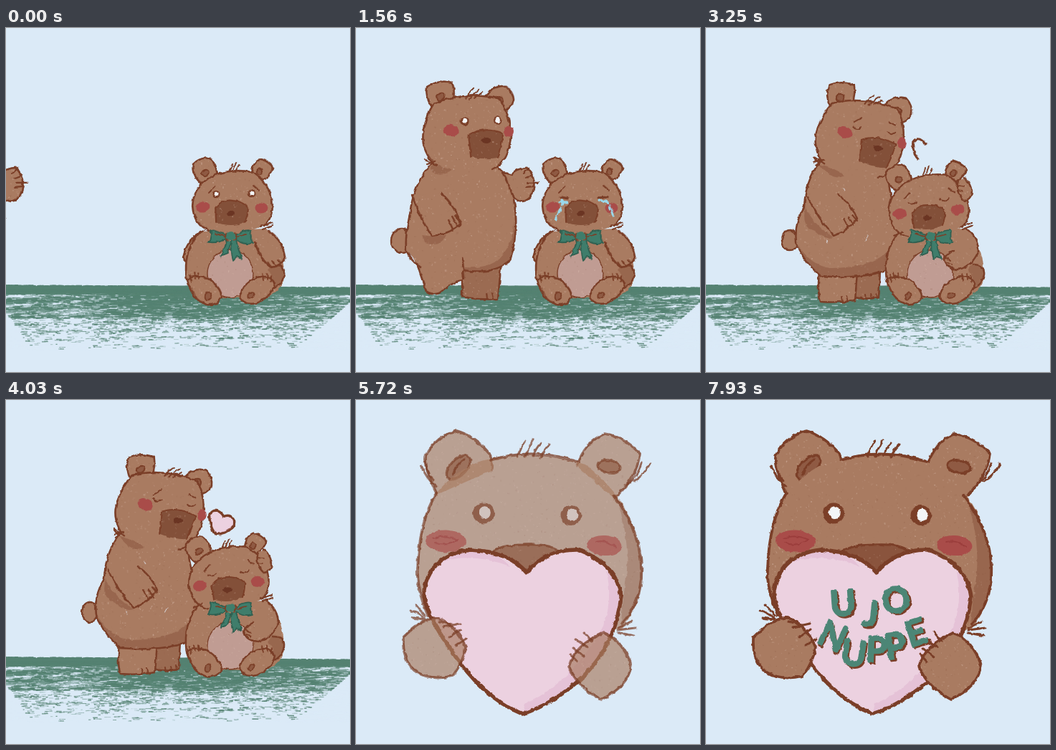
An HTML page with a canvas that plays this animation: 480x480 px, repeating every 8000 ms.

```html
<!DOCTYPE html>
<html lang="fi">
<head>
<meta charset="utf-8">
<title>Teddy bears</title>
<style>
  html, body { margin: 0; width: 100%; height: 100%; overflow: hidden; background: #dbeaf7; }
  #stage { position: relative; width: 480px; height: 480px; overflow: hidden; }
  #scene { position: absolute; inset: 0; }
  canvas { position: absolute; left: -10px; top: -10px; }
  #actors, #front { filter: url(#rough); }
  svg { position: absolute; width: 0; height: 0; }
</style>
</head>
<body>
<svg><filter id="rough" x="0" y="0" width="1" height="1" color-interpolation-filters="sRGB">
  <feTurbulence id="noise" type="fractalNoise" baseFrequency="0.13" numOctaves="2" result="n"/>
  <feDisplacementMap in="SourceGraphic" in2="n" scale="4" xChannelSelector="R" yChannelSelector="G"/>
</filter></svg>
<div id="stage">
  <div id="scene">
    <canvas id="ground" width="500" height="500"></canvas>
    <canvas id="actors" width="500" height="500"></canvas>
  </div>
  <canvas id="front" width="500" height="500"></canvas>
</div>
<script>
const LOOP = 8000, STEP = 130;
const SKY = '#dbeaf7', FUR = '#a97b61', SHADE = 'rgba(125,70,48,.38)', LINE = '#7b3f28';
const MUZZLE = '#835039', CHEEK = '#a94c49', BOW = '#3f7d6b', BELLY = '#c09c93';
const GRASS = '#558272', PINK = '#ecd1e0', TEAR = '#9ad9ec', INNER = '#8f5a43';

const $ = id => document.getElementById(id);
const layer = id => {
  const c = $(id).getContext('2d');
  c.setTransform(1, 0, 0, 1, 10, 10);
  c.lineCap = c.lineJoin = 'round';
  return c;
};
const ground = layer('ground'), actors = layer('actors'), front = layer('front');
let g = actors, boil = 0;

const clamp = v => Math.max(0, Math.min(1, v));
const lerp = (a, b, f) => a + (b - a) * f;
const rad = deg => deg * Math.PI / 180;
function random(seed) {
  return () => {
    seed = (seed + 0x6d2b79f5) | 0;
    let r = Math.imul(seed ^ seed >>> 15, 1 | seed);
    r = r + Math.imul(r ^ r >>> 7, 61 | r) ^ r;
    return ((r ^ r >>> 14) >>> 0) / 4294967296;
  };
}
// Value at time t from rows of [time, value]
function track(rows, t) {
  let i = 1;
  while (i < rows.length - 1 && t > rows[i][0]) i++;
  const [a, va] = rows[i - 1], [b, vb] = rows[i];
  return lerp(va, vb, clamp((t - a) / (b - a)));
}

const grain = (() => {
  const tile = document.createElement('canvas');
  tile.width = tile.height = 180;
  const c = tile.getContext('2d'), r = random(5);
  for (let i = 0; i < 520; i++) {
    c.fillStyle = r() < .65 ? `rgba(224,198,184,${.1 + r() * .3})` : `rgba(120,70,50,${r() * .22})`;
    c.fillRect(r() * 180, r() * 180, .6 + r() * 1.6, .6 + r() * 1.8);
  }
  return actors.createPattern(tile, 'repeat');
})();

const paths = {};
const path = d => paths[d] || (paths[d] = new Path2D(d));

function ink(d, w = 2.4, color = LINE) {
  const p = path(d);
  g.strokeStyle = color;
  g.lineWidth = w;
  g.stroke(p);
  g.save();
  g.translate(.9 - boil * .5, -.8 + boil * .4);
  g.globalAlpha *= .6;
  g.lineWidth = w * .6;
  g.setLineDash([19, 6, 33, 9]);
  g.lineDashOffset = boil * 17;
  g.stroke(p);
  g.restore();
}
function fill(d, color, textured) {
  g.fillStyle = color;
  g.fill(path(d));
  if (!textured) return;
  g.fillStyle = grain;
  g.fill(path(d));
}
function shape(d, color = FUR, w = 2.4) {
  fill(d, color, true);
  ink(d, w);
}
function oval(x, y, rx, ry, color, rot = 0, edge = 0) {
  g.beginPath();
  g.ellipse(x, y, rx, ry, rad(rot), 0, 7);
  g.fillStyle = color;
  g.fill();
  if (edge) { g.strokeStyle = LINE; g.lineWidth = edge; g.stroke(); }
}
function eye(x, y, r) {
  oval(x, y, r, r * .97, LINE);
  oval(x + r * .1, y - r * .05, r * .55, r * .6, '#f3f5f7');
}
// Draws around pivot (px, py) moved to (x, y) and turned
function turned(x, y, px, py, deg, draw) {
  g.save();
  g.translate(x, y);
  g.rotate(rad(deg));
  g.translate(-px, -py);
  draw();
  g.restore();
}

function drawGround() {
  const c = ground, r = random(21);
  const density = (x, y) => {
    if (y < 370) return 1;
    const core = Math.exp(-(((x - 245) / 150) ** 4) - ((y - 372) / 36) ** 4);
    const bands = .45 + .3 * Math.sin(y * .55 + x * .012) + .12 * Math.sin(x * .05);
    return Math.max(core, bands * clamp((452 - y) / 62));
  };
  c.fillStyle = GRASS;
  c.beginPath();
  c.moveTo(-10, 360); c.lineTo(250, 359.5); c.lineTo(490, 363);
  c.lineTo(490, 369); c.lineTo(340, 372); c.lineTo(-10, 369);
  c.fill();
  for (let i = 0; i < 520; i++) {
    const x = r() * 490 - 5;
    c.fillRect(x, 358 + x * .007 + r() * 2, 2 + r() * 5, 2);
  }
  for (let i = 0; i < 15000; i++) {
    const y = 364 + 84 * r() ** 1.15, x = r() * 500 - 10;
    const right = 492 - Math.max(0, y - 370) * 1.15, left = y > 398 ? (y - 398) * .7 : -10;
    if (x > right || x < left || r() > density(x, y)) continue;
    c.globalAlpha = .35 + r() * .55;
    const len = 2 + r() * (y < 405 ? 20 : 7);
    c.fillRect(x, y, Math.min(len, right - x + 2), .7 + r() * 1.3);
  }
  c.fillStyle = SKY;
  for (let i = 0; i < 2600; i++) {
    const y = 371 + 78 * r(), x = r() * 490;
    if (r() < density(x, y) * .85) continue;
    c.globalAlpha = .2 + r() * .5;
    c.fillRect(x, y, 1 + r() * 9, .8 + r());
  }
  c.globalAlpha = 1;
}

function bigHead(x, y, tilt, asleep) {
  turned(x, y, 122, 157, tilt, () => {
    shape('M47 112Q36 98 39 82Q55 72 74 76Q78 88 76 102');
    oval(58, 96, 6, 4.5, INNER, -35, 2.2);
    shape('M120 97Q130 80 148 81Q160 90 160 102Q155 114 143 117');
    oval(139, 101, 5.5, 6, INNER, 20, 2.2);
    const head = 'M47 188Q30 167 34 145Q38 122 48 106Q88 88 138 98Q152 112 156 145Q156 185 130 197';
    fill(head + 'Q85 208 47 188Z', FUR, true);
    ink(head);
    ink('M93 99Q97 90 103 85M99 99Q105 91 112 86M105 98L116 90', 2);
    ink('M36 184L52 191M40 190L50 186', 2.2);
    oval(73, 143, 11, 8, CHEEK, 18);
    oval(153.5, 144, 6.5, 7.5, CHEEK);
    fill('M97 149Q118 137 145 147Q143 168 138 181Q118 184 100 180Z', MUZZLE, true);
    ink('M100 180L97 149Q118 137 145 147Q143 168 138 181', 1.8);
    oval(122, 157, 6.5, 4, '#6b3523');
    if (asleep) {
      ink('M83 133Q89 138 94 132M131 132Q137 137 142 131M82 127L92 119M131 118L140 121', 1.9);
    } else {
      eye(91, 130, 6.5);
      eye(137, 129, 6);
      if (tilt) ink('M80 127L88 120M134 119L142 124', 1.9);
    }
  });
}

function walkingBear(dx, t) {
  const phase = (t - 1040) / STEP * Math.PI / 4, swing = 15 * Math.sin(phase);
  g.save();
  g.translate(dx, -3 * Math.abs(Math.sin(phase)));
  oval(4, 297, 15, 17, FUR, 0, 2.4);
  shape('M136 204Q146 200 157 205Q160 197 178 195Q190 205 188 222Q186 240 172 242Q160 240 158 231');
  ink('M174 203L181 196M177 209L187 205M179 216L195 216M178 222L188 221', 2);
  turned(115, 330, 115, 330, -swing, () => {
    shape('M88 333L88 375Q110 380 138 378L142 333', '#9b6b52');
    ink('M122 371L123 378M130 370L132 378', 1.8);
  });
  turned(60, 330, 60, 330, swing, () => shape('M22 320Q30 345 38 368Q45 373 56 370Q70 358 90 350L88 328'));
  const body = 'M88 321L90 338Q130 345 155 325Q168 280 160 240Q152 210 138 194';
  fill('M47 188Q20 215 15 260Q8 290 10 310Q30 337 60 342L90 338Q130 345 155 325Q168 280 160 240Q152 210 138 194Z', FUR, true);
  fill('M160 270Q160 305 135 326Q118 336 92 334L90 339Q130 345 155 325Q163 300 160 270Z', SHADE);
  fill('M48 190Q68 184 74 198Q55 212 44 197Z', SHADE);
  ink(body);
  ink('M47 188Q20 215 15 260Q8 290 10 310Q16 325 30 334');
  fill('M18 232Q30 270 46 290Q70 288 85 274Q80 250 58 230Z', FUR, true);
  fill('M33 289L48 291Q62 290 66 288Q60 306 36 299Z', SHADE);
  ink('M18 232Q30 270 46 290Q70 288 85 274Q80 250 58 230');
  ink('M69 268L75 281M74 263L81 276M78 262L86 270', 2);
  bigHead(122, 157, 0, false);
  g.restore();
}

function huggingBear(dx, t) {
  const calm = t >= 2730;
  g.save();
  g.translate(dx, 0);
  oval(117, 296, 11, 14, FUR, 0, 2.4);
  shape('M208 340L206 376Q225 379 241 376L243 338', '#9b6b52');
  ink('M222 372L223 379M230 371L232 378M237 370L238 376', 1.8);
  shape('M158 340Q155 370 160 382Q185 384 208 380L211 340');
  ink('M189 375L190 383M196 374L198 382', 1.8);
  const left = 'M158 188Q138 215 137 250Q121 275 127 305Q140 330 160 346';
  const right = 'Q205 350 240 342Q275 330 277 300Q274 285 262 250Q255 225 252 194';
  fill(left + right + 'Z', FUR, true);
  fill('M127 300Q145 332 175 335Q230 335 256 310Q270 295 268 270L277 300Q275 330 240 342Q205 350 160 346Q138 328 127 300Z', SHADE);
  fill('M139 250Q150 275 178 292Q165 296 152 283Q132 278 139 250Z', SHADE);
  fill('M158 190Q184 196 194 207Q175 214 158 190Z', SHADE);
  ink(left);
  ink('M160 346' + right);
  ink('M142 236Q156 266 178 290Q197 284 211 266Q203 245 184 232');
  ink('M192 266L199 279M198 264L206 276M204 261L211 269', 2);
  ink('M222 297L226 290M170 300L168 295M192 224L194 228', 1, 'rgba(226,231,240,.75)');
  bigHead(calm ? 240 : 239, calm ? 168 : 165, calm ? 10 : 8, calm);
  ink('M150 180L158 190M151 188L163 184M153 192L160 187', 2.2);
  g.restore();
}

function tears(t) {
  const fall = t / 390 % 1;
  ink('M287 240L290 244M284 243L294 243M339 240L351 243', 3, TEAR);
  for (let i = 0; i < 3; i++) {
    const f = (fall + i / 3) % 1;
    oval(lerp(289, 275, f), lerp(245, 276, f), 1.5, 3.4, TEAR, 20);
    oval(lerp(350, 362, f), lerp(243, 268, f), 1.5, 3.2, TEAR, -20);
  }
  ink('M286 250L280 262M354 246L358 257', 1.5, TEAR);
}

function smallHead(t, hug) {
  const cry = t >= 650 && t < 2730;
  shape('M272 217Q258 204 261 190Q270 180 284 182Q296 192 294 208');
  oval(278, 202, 5, 4, INNER, -25, 2);
  shape('M342 203Q345 186 356 183Q369 188 373 196Q370 206 357 212');
  oval(354, 200, 4, 4.5, INNER, 30, 2);
  const head = 'M284 283Q262 276 260 248Q262 218 292 205Q316 196 343 201Q362 212 370 235Q376 262 360 276';
  fill(head + 'Q318 292 284 283Z', FUR, true);
  ink(head);
  ink('M311 200L316 190M315 200L321 188M320 200L325 191', 1.8);
  oval(275, 250, 9.5, 7.5, CHEEK, -10);
  oval(356, 251, 9.5, 7.5, CHEEK);
  fill('M292 251Q300 239 316 241Q334 243 338 252Q337 263 333 271Q315 279 293 271Z', MUZZLE, true);
  ink('M293 271L292 251Q300 239 316 241Q334 243 338 252Q337 263 333 271', 1.8);
  oval(313, 259, 6, 3.4, '#6b3523');
  ink('M283 230L291 222M345 220L353 227', 1.8);
  if (hug) ink('M288 236Q294 240 300 235M333 235Q339 240 345 235', 1.8);
  else if (cry) ink('M285 236L296 238M338 237L351 236', 3);
  else { eye(293, 232, 5.5); eye(342, 231, 5.5); }
  if (cry) tears(t);
}

function bow() {
  fill('M308 295Q306 308 299 318L309 314L314 298Z', BOW);
  ink('M308 295Q306 308 299 318L309 314L314 298', 1.5, '#305f50');
  fill('M315 296Q313 312 317 324L322 319L329 322Q324 308 321 296Z', BOW);
  ink('M315 296Q313 312 317 324L322 319L329 322Q324 308 321 296', 1.5, '#305f50');
  for (const d of ['M307 289L285 281Q288 290 282 299Q296 301 307 294Z', 'M320 289Q335 280 342 283Q340 292 344 300Q331 304 320 294Z']) {
    fill(d, BOW);
    ink(d, 1.6, '#305f50');
  }
  oval(313.5, 290, 7.5, 6, BOW);
  ink('M307 287Q304 292 309 296M320 286Q323 291 318 296M292 287L305 291M335 288L323 291', 1.6, LINE);
}

function smallBear(t) {
  const hug = t >= 1950;
  if (!hug) shape('M276 283Q252 294 247 320Q250 329 257 326Q270 312 274 300');
  const body = 'M270 284Q250 308 251 338Q251 365 270 375L360 378Q390 365 388 342Q386 300 362 280Z';
  fill(body, FUR, true);
  ink('M270 284Q250 308 251 338Q251 355 256 362M372 330Q390 330 388 345Q384 360 372 364');
  fill('M372 328Q390 332 387 345Q380 362 370 363Q376 345 365 338Z', SHADE);
  oval(313, 343, 32, 33, BELLY, 0, 1.4);
  g.fillStyle = grain;
  g.fill();
  shape('M253 351Q262 343 282 350Q300 362 301 376Q294 388 280 386Q258 378 253 351');
  oval(282, 374, 4, 6, INNER, 25, 1.8);
  ink('M256 344L259 354M262 342L264 351M268 342L269 349', 1.7);
  shape('M326 376Q328 358 350 348Q370 344 375 357Q372 374 350 384Q332 388 326 376');
  oval(342, 373, 5, 3.5, INNER, -30, 1.8);
  ink('M357 343L359 352M364 343L365 351M370 346L370 354', 1.7);
  if (hug) {
    shape('M363 280Q380 292 380 312Q370 334 352 337Q334 336 332 322Q337 314 346 310');
    ink('M333 319L341 325M334 326L342 330', 1.7);
    turned(309, 265, 313, 259, -5, () => smallHead(t, true));
    shape('M352 212Q347 230 360 241Q370 240 371 228Q368 214 360 209');
    ink('M352 220L360 221M351 227L358 228', 1.7);
  } else {
    shape('M347 299Q356 326 370 334Q385 332 389 320Q385 295 366 283');
    ink('M365 327L370 334M372 326L376 332M380 324L384 329', 1.7);
    smallHead(t, false);
  }
  ink('M355 277L371 272M358 281L372 276M262 290L274 284', 2.2);
  bow();
}

const HEART = 'M232 438Q175 415 130 345Q92 290 95 265Q105 215 160 209Q215 212 238 241Q265 208 310 209Q365 230 370 275Q362 340 318 385Q275 425 232 438';
// time, tip x, tip y, scale, tilt
const GROW = [[3900, 296, 183, .116, 23], [4680, 267, 221, .29, 14], [5460, 232, 438, 1, 0]];

function heart(t) {
  if (t < 3120) return;
  const [a, b] = t < 4680 ? [GROW[0], GROW[1]] : [GROW[1], GROW[2]];
  const s = a[3] * (b[3] / a[3]) ** clamp((t - a[0]) / (b[0] - a[0]));
  const f = (s - a[3]) / (b[3] - a[3]), at = i => lerp(a[i], b[i], f);
  g.save();
  g.translate(at(1), at(2));
  g.rotate(rad(at(4)));
  g.scale(s, s);
  g.translate(-232, -438);
  if (t >= 3640) {
    fill(HEART, PINK);
    fill('M350 240Q362 300 330 340Q290 400 236 424L232 438Q275 425 318 385Q362 340 370 275Q366 250 350 240ZM120 226Q160 212 215 232Q190 206 160 209Q135 211 120 226Z', 'rgba(217,171,200,.4)');
    ink(HEART, lerp(3, 5.4, clamp((s - .116) / .12)) / s);
  } else {
    g.strokeStyle = LINE;
    g.lineWidth = 3 / s;
    g.setLineDash([940 * clamp((t - 3000) / 560), 3000]);
    g.stroke(path(HEART));
  }
  g.restore();
}

function faceBehindHeart() {
  shape('M113 132Q95 95 97 78Q110 52 140 43Q165 50 186 75Q191 88 190 98', FUR, 3.6);
  oval(143, 94, 21, 11, INNER, -46, 3.5);
  ink('M135 104Q138 91 151 83', 3);
  shape('M308 92Q320 58 347 47Q375 52 396 75Q392 110 360 137', FUR, 3.6);
  oval(353, 93, 16, 9, INNER, 10, 3.5);
  fill('M112 130Q150 85 200 80Q260 70 320 90Q365 125 382 165Q402 215 398 250Q395 290 370 320L110 310Q84 265 86 235Q88 170 112 130Z', FUR, true);
  fill('M362 132Q400 190 398 250Q394 292 370 310Q372 280 376 255Q385 200 362 132Z', SHADE);
  ink('M100 300Q84 262 86 235Q88 170 112 130M188 84Q246 66 308 86M360 134Q402 190 398 250Q394 288 371 312', 3.8);
  ink('M225 79Q230 66 236 57M236 79Q241 65 247 56M247 78Q251 67 258 60M258 80Q263 68 270 62', 3);
  ink('M91 92Q98 110 112 121M96 86Q98 102 108 112M410 89Q402 105 388 113M398 88Q393 107 378 119', 2.8);
  ink('M76 294Q88 297 96 305M83 286L96 301M78 304L94 306M366 318L385 309M366 321L390 318M366 325L388 329', 2.8);
  oval(125, 197, 28, 15.5, CHEEK, 2);
  oval(347, 203, 24.5, 14, CHEEK, 4);
  ink('M108 193Q125 187 142 195Q125 206 110 199M335 198Q350 195 362 205', 2, 'rgba(145,52,52,.5)');
  eye(178, 158, 15);
  eye(300, 161, 14.5);
  shape('M188 213Q200 202 235 202Q270 200 284 211L238 246Z', '#8a543d', 3);
}

function paws() {
  shape('M66 331Q95 302 115 304Q140 315 153 345Q150 365 135 385Q105 392 85 380Q64 366 66 331', FUR, 3.6);
  ink('M115 309L133 313M122 317L145 312M130 331L146 320M139 342L154 333', 3);
  shape('M345 325Q372 335 384 370Q380 400 342 418Q308 400 297 372Q305 342 345 325', FUR, 3.6);
  ink('M318 324L329 337M306 334L323 345M303 347L318 358M299 355L308 365', 3);
}

const LETTERS = [['U', 191, 283, -4], ['J', 230, 298, 6], ['O', 265, 279, -10],
  ['N', 177, 329, 25], ['U', 206, 353, 8], ['P', 238, 348, 2], ['P', 264, 343, -8], ['E', 293, 324, -17]];

function lettering(t) {
  g.font = '400 48px Lato, sans-serif';
  g.textAlign = 'center';
  LETTERS.forEach(([ch, x, y, rot], i) => {
    const shown = clamp((t - 5850) / 200 - i);
    if (!shown) return;
    turned(x, y, 0, 0, rot, () => {
      g.beginPath();
      g.rect(-26, -34, 52 * shown, 70);
      g.clip();
      g.lineWidth = 4;
      for (const [off, color] of [[2.4, LINE], [0, '#4c8676']]) {
        g.fillStyle = g.strokeStyle = color;
        g.fillText(ch, off, 17 + off);
        g.strokeText(ch, off, 17 + off);
      }
    });
  });
}

const WALK = [[0, -165], [1040, 0], [1820, 90], [1950, 100], [2080, 111]];

function render(t) {
  const step = Math.floor(t / STEP);
  t = step * STEP;
  boil = step % 4;
  $('noise').setAttribute('seed', boil + 2);
  grain.setTransform(new DOMMatrix().translate(boil * 47, boil * 31));
  actors.clearRect(-10, -10, 500, 500);
  front.clearRect(-10, -10, 500, 500);

  const alpha = 1 - clamp((t - 4290) / 1110);
  $('scene').style.opacity = alpha;
  g = actors;
  if (alpha > 0) {
    const dx = track(WALK, t);
    if (t < 1950) walkingBear(dx, t);
    else huggingBear(dx - 111, t);
    smallBear(t);
  }

  g = front;
  const near = clamp((t - 5460) / 390);
  g.globalAlpha = near;
  if (near) faceBehindHeart();
  g.globalAlpha = 1;
  heart(t);
  g.globalAlpha = near;
  if (near) paws();
  g.globalAlpha = 1;
  lettering(t);
}

drawGround();
const start = performance.now();
let last = -1;
function tick() {
  const t = (performance.now() - start) % LOOP, step = Math.floor(t / STEP);
  if (step !== last) render(t);
  last = step;
  requestAnimationFrame(tick);
}
tick();
</script>
</body>
</html>
```
